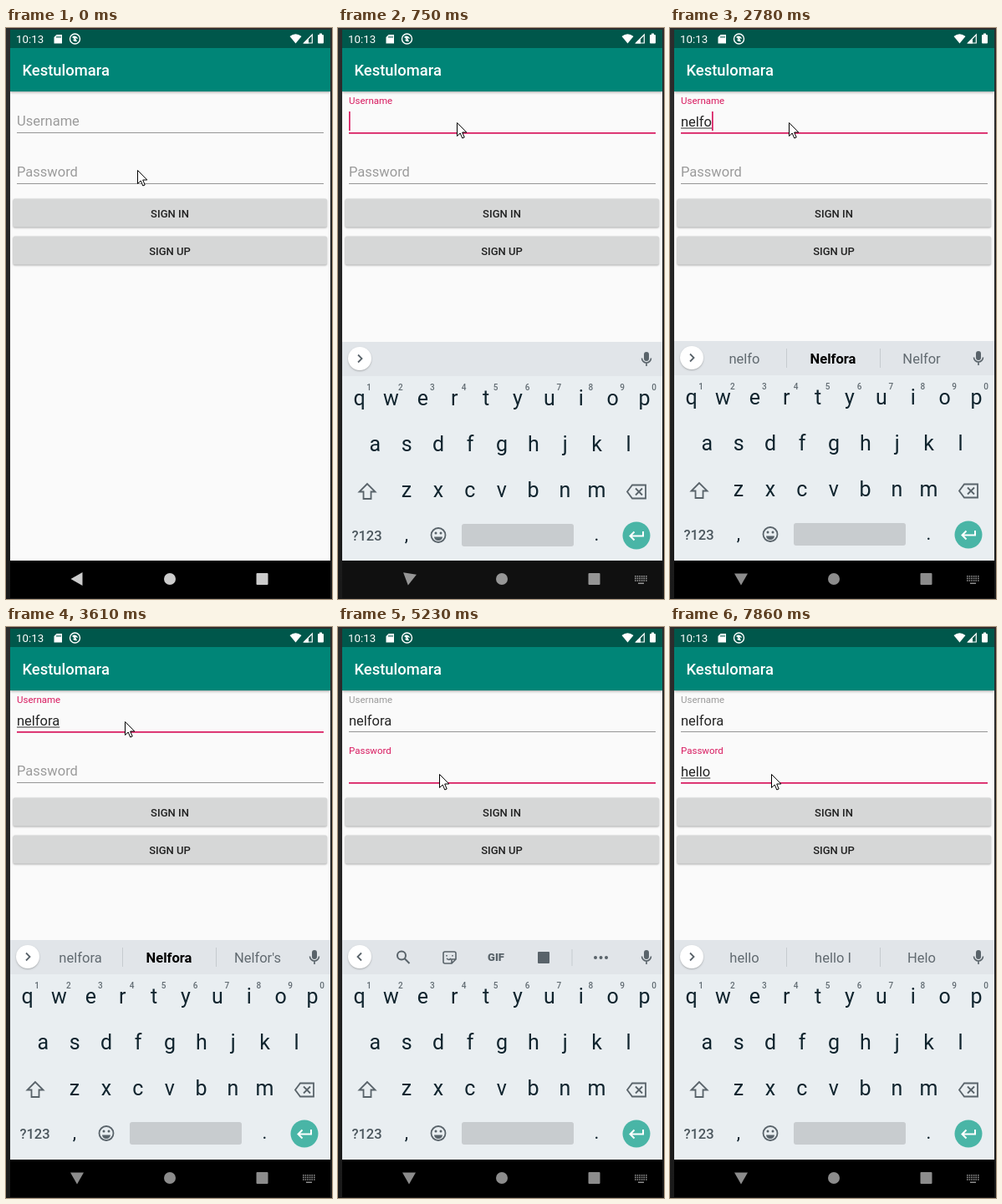
Animation of 390x684 px, one loop 8000 ms. Source, as an HTML page with a canvas:

```html
<!DOCTYPE html>
<html lang="en">
<head>
<meta charset="utf-8">
<title>Sign in</title>
<style>
  html, body { margin: 0; width: 100%; height: 100%; overflow: hidden; background: #222; }
  canvas { display: block; }
</style>
</head>
<body>
<canvas id="stage" width="390" height="684"></canvas>
<script>
const g = document.getElementById('stage').getContext('2d');
const LOOP = 8000, PINK = '#d81b60', GREY = '#9b9b9b', ICON = '#59636a';

const TICKS = [0, 120, 270, 510, 630, 750, 870, 990, 1520, 2110, 2230, 2500, 2780, 2900, 3050,
  3610, 4010, 4130, 4280, 4560, 4710, 4830, 4950, 5230, 5790, 6350, 6720, 7030, 7180, 7330, 7860];
const CARET_TOGGLES = [510, 1520, 2110, 3610, 4130, 4560, 4710, 5230, 5790, 6350, 6720, 7860];
const POINTER = [[0, 157, 170], [120, 144, 131], [270, 142, 113], [4010, 138, 138],
  [4130, 132, 163], [4280, 121, 176]];
const USER = [[0, ''], [2110, 'n'], [2230, 'ne'], [2500, 'nel'], [2780, 'nelfo'],
  [2900, 'nelfor'], [3050, 'nelfora']];
const PASS = [[0, ''], [6720, 'he'], [7030, 'hel'], [7180, 'hell'], [7330, 'hello']];
const STRIP = [[0, ''], [870, 'tools'], [2110, 'n', 'no', 'not'], [2230, 'ne', 'new', 'next'],
  [2500, 'nel', 'need', 'bell'], [2780, 'nelfo', 'Nelfora', 'Nelfor'],
  [2900, 'nelfor', 'Nelfor', 'Nelfora'], [3050, 'nelfora', 'Nelfora', "Nelfor's"],
  [4830, 'tools'], [6720, 'he', 'hey', 'hello'], [7030, 'hel', 'he', 'hello'],
  [7180, 'hell', 'hello', "he'll"], [7330, 'hello', 'hello I', 'Helo']];

const clamp = v => Math.max(0, Math.min(1, v));
const mix = (a, b, p) => a + (b - a) * p;
const latest = (list, t) => list.filter(e => e[0] <= t).pop().slice(1);

function rect(x, y, w, h, color, r = 0) {
  g.fillStyle = color;
  g.beginPath();
  g.roundRect(x, y, w, h, r);
  g.fill();
}
function disc(x, y, r, color) {
  g.fillStyle = color;
  g.beginPath();
  g.arc(x, y, r, 0, 7);
  g.fill();
}
function fill(d, color) {
  g.fillStyle = color;
  g.fill(new Path2D(d));
}
function stroke(d, color, width = 2) {
  g.strokeStyle = color;
  g.lineWidth = width;
  g.stroke(new Path2D(d));
}
function text(s, x, y, size, color, weight = 400, align = 'center') {
  g.font = `${weight} ${size}px Roboto, sans-serif`;
  g.textAlign = align;
  g.fillStyle = color;
  g.fillText(s, x, y);
}
function shadow(blur, dy, alpha, draw) {
  g.save();
  g.shadowColor = `rgba(0,0,0,${alpha})`;
  g.shadowBlur = blur;
  g.shadowOffsetY = dy;
  draw();
  g.restore();
}

function statusBar() {
  rect(5, 2, 383, 22, '#00574b');
  text('10:13', 12, 18, 13.3, '#fff', 400, 'left');
  fill('M60.5 8H67V18.5H57.5V11Z', '#fff');
  stroke('M61 9.5v2.5M63 9.5v2.5M65 9.5v2.5', '#00574b', 1);
  stroke('M88.5 13a6 6 0 1 1-12 0a6 6 0 1 1 12 0', '#fff', 1.4);
  fill('M79 11a4 4 0 0 1 7 2l-3-1l2 4a4 4 0 0 1-5-2l2-.5Z', '#fff');
  fill('M339.5 10Q346.500 4.500 353.500 10L346.500 18.500Z', '#fff');
  stroke('M366.300 8V18H356.500Z', '#fff', 1.2);
  fill('M356 18.500L362 12.500V18.500Z', '#fff');
  rect(373, 8, 7, 10.5, '#fff', 1);
  rect(375, 6.5, 3, 2, '#fff');
}

function field(label, y, value, start, active, composing, caret, t) {
  const p = clamp((t - start) / 180), lift = p * p * (3 - 2 * p);
  text(label, 13, y - mix(8, 33.8, lift), mix(16.5, 11.5, lift), active ? PINK : GREY, 400, 'left');
  rect(13, y, 367, active ? 1.7 : 1, active ? PINK : '#959595');
  text(value, 13, y - 7, 16.5, '#252525', 400, 'left');
  const width = g.measureText(value).width;
  if (composing) rect(13, y - 5.5, width, 1, '#333');
  if (caret) rect(13 + width, y - 25, 1.7, 23, PINK);
}

function button(label, y) {
  shadow(2, 1, 0.3, () => rect(8.500, y, 375.5, 34, '#d6d7d7', 2));
  text(label, 196, y + 22, 13, '#212121', 500);
}

function tools() {
  stroke('M81 393.500a5 5 0 1 1-10 0a5 5 0 1 1 10 0M79.500 397l6 6', ICON);
  stroke('M128 389h11a2 2 0 0 1 2 2v7l-5 5h-8a2 2 0 0 1-2-2v-10a2 2 0 0 1 2-2M136 403v-5h5' +
    'M130 393v1.500M137 393v1.500M130 397q3 3 5 0', ICON, 1.6);
  text('GIF', 189, 400, 13, ICON, 900);
  rect(239, 389, 14, 14, ICON, 1);
  rect(279.5, 386, 1, 20, '#c6cbcf');
  for (const x of [308, 314.5, 321]) disc(x, 396, 2, ICON);
}

function suggestions(words) {
  words.forEach((word, i) => {
    const bold = i === 1 && word !== 'hello I';
    text(word, 89 + 106 * i, 402, 16.5, bold ? '#000' : '#616a70', bold ? 700 : 400);
  });
  rect(139, 384, 1, 23, '#c6cbcf');
  rect(251, 384, 1, 23, '#c6cbcf');
}

function keyboard(words) {
  rect(5, 416, 383, 222, '#e9eef1');
  rect(5, 375, 383, 41, '#e1e5e9');
  shadow(2, 1, 0.25, () => disc(26, 395, 14, '#fff'));
  const isTools = words[0] === 'tools';
  stroke(isTools ? 'M28 390.500l-4.500 4.500l4.500 4.500' : 'M24 390.500l4.500 4.500l-4.500 4.500', ICON, 1.8);
  rect(366, 387, 6, 11, ICON, 3);
  stroke('M363.500 394.500a5.500 5.500 0 0 0 11 0M369 400v4', ICON, 1.6);
  if (isTools) tools();
  else if (words[0]) suggestions(words);

  [['qwertyuiop', 25.5], ['asdfghjkl', 44.3], ['zxcvbnm', 82]].forEach(([keys, x], row) =>
    [...keys].forEach((key, i) => text(key, x + 37.9 * i, 451 + 55 * row, 25, '#10242e')));
  [...'1234567890'].forEach((digit, i) => text(digit, 37 + 37.9 * i, 433, 10, '#626c73', 500));

  stroke('M35 545l-9.500 9.500h5v8.500h9v-8.500h5Z', ICON, 1.8);
  stroke('M352 546.500h16v16h-16l-6-8ZM356 550.500l8 8M364 550.500l-8 8', ICON, 1.8);
  text('?123', 34.5, 613, 16.5, '#4b565d', 500);
  text(',', 82, 613, 22, '#10242e');
  text('.', 309.5, 613, 22, '#10242e');
  stroke('M128.500 606.500a8.500 8.500 0 1 1-17 0a8.500 8.500 0 1 1 17 0', ICON, 1.8);
  disc(117, 604, 1.5, ICON);
  disc(123, 604, 1.5, ICON);
  fill('M115 608.500h10a5 4.500 0 0 1-10 0', ICON);
  rect(148, 593, 134, 27, '#c8cccf', 3);
  disc(357, 607, 16.5, '#49b5a6');
  stroke('M365 602v5.500h-15M354.500 602.500l-5 5l5 5', '#fff');
}

function navBar(p) {
  g.globalAlpha = p > 0 ? mix(0.38, 1, p) : 1;
  rect(5, 638, 383, 45, '#000');
  g.globalAlpha = 1;
  const shade = p > 0 ? mix(235, 140, p) : 204, color = `rgb(${shade},${shade},${shade})`;
  g.save();
  g.translate(85, 660);
  g.rotate(-Math.PI / 2 * p);
  fill('M-7.500 0L6.500 -8V8Z', color);
  g.restore();
  disc(196, 660, 7, color);
  rect(299.5, 653, 14, 14, color, 1);
  if (p > 0) {
    for (let row = 0; row < 3; row++)
      for (let i = 0; i < 6; i++) rect(355 + 2.6 * i, 656 + 2.6 * row, 1.6, 1.6, color);
    rect(359, 664.5, 7, 1.5, color);
  }
}

function pointer(x, y) {
  g.save();
  g.translate(x + 0.5, y + 0.5);
  const arrow = 'M0 0V16L3.700 12.500L6.300 18.500L8.700 17.500L6.200 11.500H11.300Z';
  fill(arrow, '#fff');
  g.lineJoin = 'round';
  stroke(arrow, '#000', 1);
  g.restore();
}

function draw(t) {
  const caret = CARET_TOGGLES.filter(c => c <= t).length % 2 === 1;
  const onUser = t >= 510 && t < 4710, onPass = t >= 4710;
  const rise = clamp((t - 570) / 200);

  const edge = g.createLinearGradient(0, 0, 0, 684);
  edge.addColorStop(0, '#2d2d2d');
  edge.addColorStop(1, '#1a1a1a');
  rect(0, 0, 390, 684, edge);
  rect(5, 24, 383, 659, '#fafafa');
  shadow(3, 1, 0.35, () => rect(5, 24, 383, 52, '#008577'));
  rect(0, 24, 5, 56, edge);
  rect(388, 24, 2, 56, edge);
  statusBar();
  text('Kestulomara', 19.5, 57, 18.4, '#fff', 500, 'left');

  field('Username', 125, latest(USER, t)[0], 495, onUser, onUser, onUser && caret, t);
  field('Password', 186, latest(PASS, t)[0], 4695, onPass, onPass, onPass && caret, t);
  button('SIGN IN', 204.5);
  button('SIGN UP', 249.500);

  if (rise > 0) {
    g.save();
    g.beginPath();
    g.rect(5, 300, 383, 383);
    g.clip();
    g.globalAlpha = clamp(rise * 2);
    g.translate(0, Math.round(135 * (1 - rise) ** 2));
    keyboard(latest(STRIP, t));
    g.restore();
  }
  navBar(rise);
  pointer(...latest(POINTER, t));
}

function loop() {
  const now = performance.now() % LOOP;
  draw(TICKS.filter(tick => tick <= now).pop());
  requestAnimationFrame(loop);
}
loop();
</script>
</body>
</html>
```
